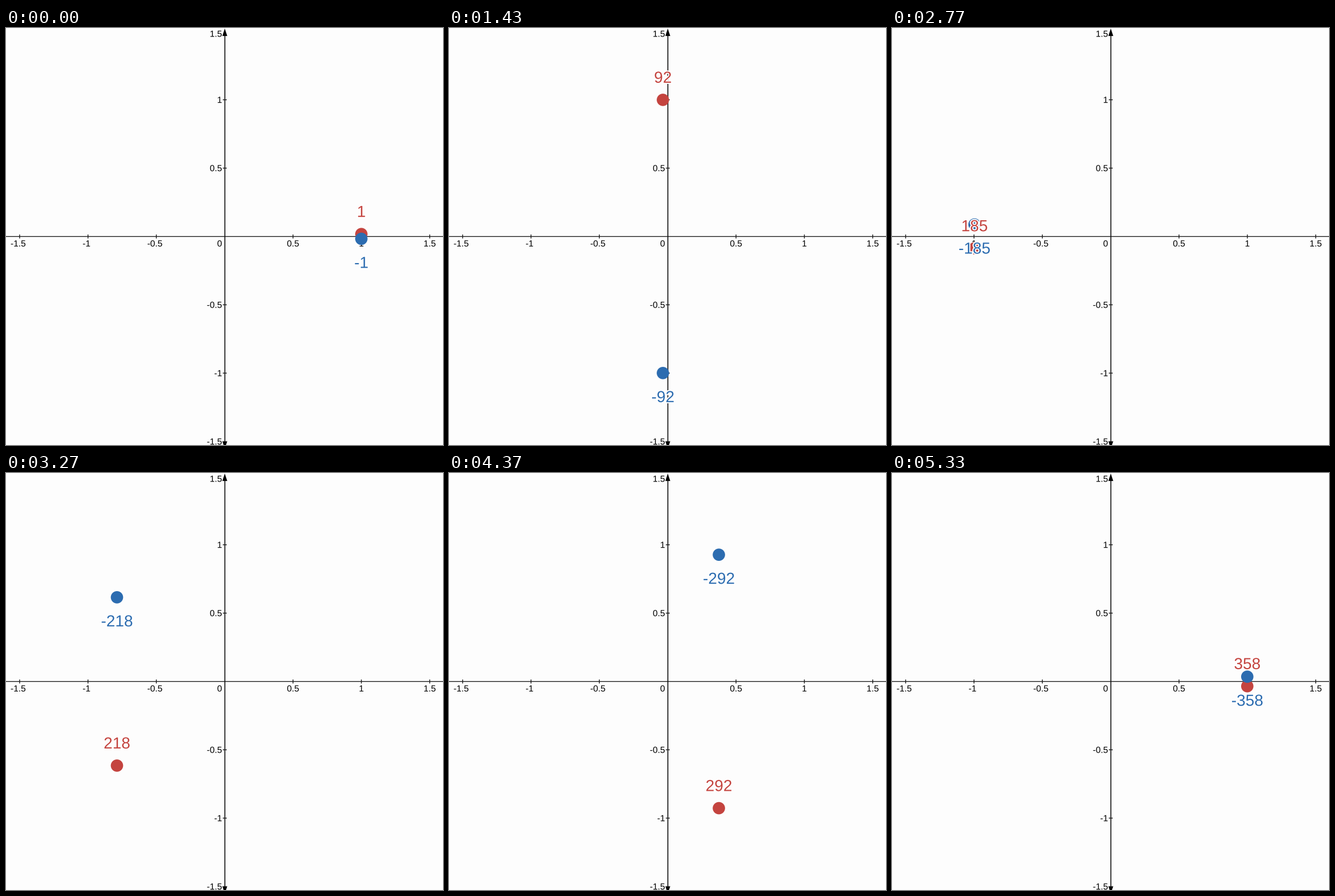
Recreate the animation shown at these times as a matplotlib script. Size 766x731 px, loop 5360 ms.

```python
import numpy as np
import matplotlib.pyplot as plt
from matplotlib.animation import FuncAnimation
from matplotlib.patches import Circle, PathPatch, Polygon
from matplotlib.path import Path
from matplotlib.patheffects import withStroke
from matplotlib.textpath import TextPath

W, H, DPI = 766, 731, 64
PX = 72 / DPI                  # points per pixel
FRAMES, LOOP_MS = 161, 5360
OX, OY, UNIT = 383.3, 365.4, 239.6
RED, BLUE, INK = "#c4443f", "#2c6cb0", "#111111"
ADVANCE = {"-": 0.333, ".": 0.278}

fig = plt.figure(figsize=(W / DPI, H / DPI), dpi=DPI, facecolor="#fdfdfd")
ax = fig.add_axes([0, 0, 1, 1])
ax.set(xlim=(0, W), ylim=(H, 0))
ax.axis("off")


def text_width(text, size):
    return size * sum(ADVANCE.get(c, 0.556) for c in text)


def text_path(text, x, baseline, size):
    glyphs = TextPath((0, 0), text, size=size, prop={"family": "Liberation Sans"})
    return Path(glyphs.vertices * [1, -1] + [x, baseline], glyphs.codes)


def line(x0, y0, x1, y1, width):
    ax.plot([x0, x1], [y0, y1], color=INK, lw=width * PX,
            solid_capstyle="butt", snap=False, zorder=1)


def tick_label(text, x, baseline):
    ax.add_patch(PathPatch(text_path(text, x, baseline, 15.5), fc="black",
                           lw=0, snap=False, zorder=1))


def draw_axes():
    line(0, 365.5, W, 365.5, 1.3)
    line(383.6, 6, 383.6, H, 1.7)
    for tip, base in ((1, 14), (737, 724.5)):
        ax.add_patch(Polygon([(383.5, tip), (379.2, base), (387.8, base)],
                             fc="black", lw=0, zorder=1))
    for v in np.arange(-1.5, 2, 0.5):
        text = f"{v:g}"
        if v == 0:
            tick_label(text, 378.7 - text_width(text, 15.5), 383)
            continue
        x, y = OX + v * UNIT, OY - v * UNIT
        line(x, 362, x, 369, 1.3)
        if abs(v) < 1.5:
            line(380, y, 387, y, 1.3)
        # the minus sign hangs left of the centred digits
        shift = text_width("-", 15.5) / 2 if v < 0 else 0
        tick_label(text, x - shift - text_width(text, 15.5) / 2, 383)
        tick_label(text, 378.7 - text_width(text, 15.5), max(y, 10) + 5.4)


class Marker:
    def __init__(self, sign, color, drop):
        self.sign, self.drop = sign, drop
        self.dot = ax.add_patch(Circle((0, 0), 10.8, fc=color, lw=0, zorder=2))
        self.label = ax.add_patch(PathPatch(
            Path([(0, 0)]), fc=color, lw=0, snap=False, zorder=3,
            path_effects=[withStroke(linewidth=4 * PX, foreground="white")]))

    def move(self, degrees):
        value = self.sign * degrees
        a = np.radians(value)
        x, y = OX + UNIT * np.cos(a), OY - UNIT * np.sin(a)
        self.dot.center = x, y
        text = str(value)
        self.label.set_path(text_path(
            text, x - text_width(text, 28) / 2, y + self.drop, 28))


draw_axes()
markers = [Marker(1, RED, -30), Marker(-1, BLUE, 51)]

# the slider runs at a slightly uneven pace
KEYS = [0, 25, 61, 83, 113, 131, 160]
ANGLES = [1, 54, 134, 185, 251, 292, 358]


def update(i):
    degrees = int(round(float(np.interp(i, KEYS, ANGLES))))
    for m in markers:
        m.move(degrees)
    return [p for m in markers for p in (m.dot, m.label)]


anim = FuncAnimation(fig, update, frames=FRAMES, interval=LOOP_MS / FRAMES,
                     repeat=True, repeat_delay=0, blit=False)
plt.show()
```
